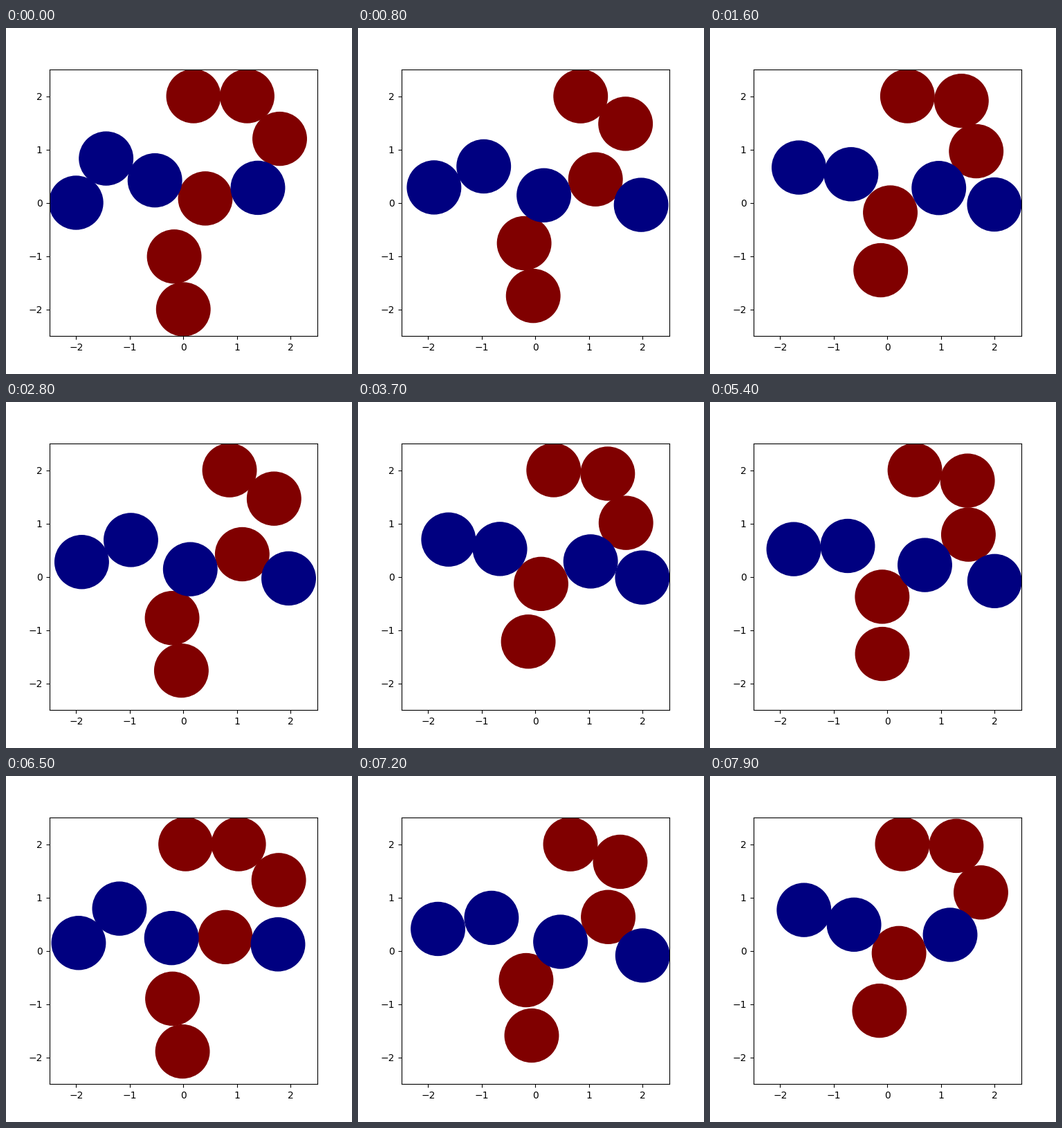
Recreate the animation shown at these times as a matplotlib script. Size 500 by 500 pixels, loop 8 s.

```python
import numpy as np
import matplotlib.pyplot as plt
from matplotlib.animation import FuncAnimation
from matplotlib.patches import Circle

FRAMES, STEP_MS = 80, 100
PERIOD = 2.03      # seconds between two discs entering the same lane
KNOT = PERIOD / 3  # seconds between two key points
RED, BLUE = "#800000", "#000080"

# Key points, evenly spaced in time.
UP = [
    (0, -2), (-.03, -1.8), (-.095, -1.44),
    (-.17, -1.01), (-.21, -.82), (-.09, -.365),
    (.41, .08), (1.02, .373), (1.52, .8),
    (1.797, 1.2), (1.717, 1.42), (1.49, 1.81),
    (1.19, 2), (.912, 2), (.506, 2),
    (.19, 2), (-.045, 2),
]
ACROSS = [
    (-2, 0), (-1.912, .242), (-1.741, .525),
    (-1.44, .83), (-1.03, .714), (-.735, .576),
    (-.53, .42), (.037, .153), (.713, .223),
    (1.39, .28), (1.93, 0), (2, -.08), (2, .1),
]


def spline_slopes(p):
    """Slopes of the natural cubic spline through evenly spaced points."""
    n = len(p)
    a = 4 * np.eye(n) + np.eye(n, k=1) + np.eye(n, k=-1)
    a[0, 0] = a[-1, -1] = 2
    q = np.pad(p, ((1, 1), (0, 0)), mode="edge")
    return np.linalg.solve(a, 3 * (q[2:] - q[:-2]))


class Lane:
    """Discs that enter once per period and follow one smooth path."""

    def __init__(self, ax, color, points, life):
        self.p = np.array(points, float)
        self.m = spline_slopes(self.p)
        self.life = life
        self.discs = [
            ax.add_patch(Circle((0, 0), 0.5, facecolor=color, edgecolor=color, linewidth=1))
            for _ in range(int(life / PERIOD) + 1)
        ]

    def at(self, age):
        i, s = divmod(age / KNOT, 1)
        i = int(i)
        r = 1 - s
        pos = (r * r * ((1 + 2 * s) * self.p[i] + s * self.m[i])
               + s * s * ((1 + 2 * r) * self.p[i + 1] - r * self.m[i + 1]))
        return np.clip(pos, -2, 2)

    def update(self, time):
        for k, disc in enumerate(self.discs):
            age = time % PERIOD + k * PERIOD
            alive = age < self.life
            disc.set_visible(alive)
            if alive:
                disc.center = self.at(age)


fig, ax = plt.subplots(figsize=(5, 5), dpi=100)
ax.set(xlim=(-2.5, 2.5), ylim=(-2.5, 2.5), xticks=range(-2, 3), yticks=range(-2, 3))

lanes = [Lane(ax, RED, UP, 10.7), Lane(ax, BLUE, ACROSS, 7.8)]


def draw(frame):
    for lane in lanes:
        lane.update(frame * STEP_MS / 1000)
    return [disc for lane in lanes for disc in lane.discs]


anim = FuncAnimation(fig, draw, frames=FRAMES, interval=STEP_MS, repeat=True, repeat_delay=0)
plt.show()
```
